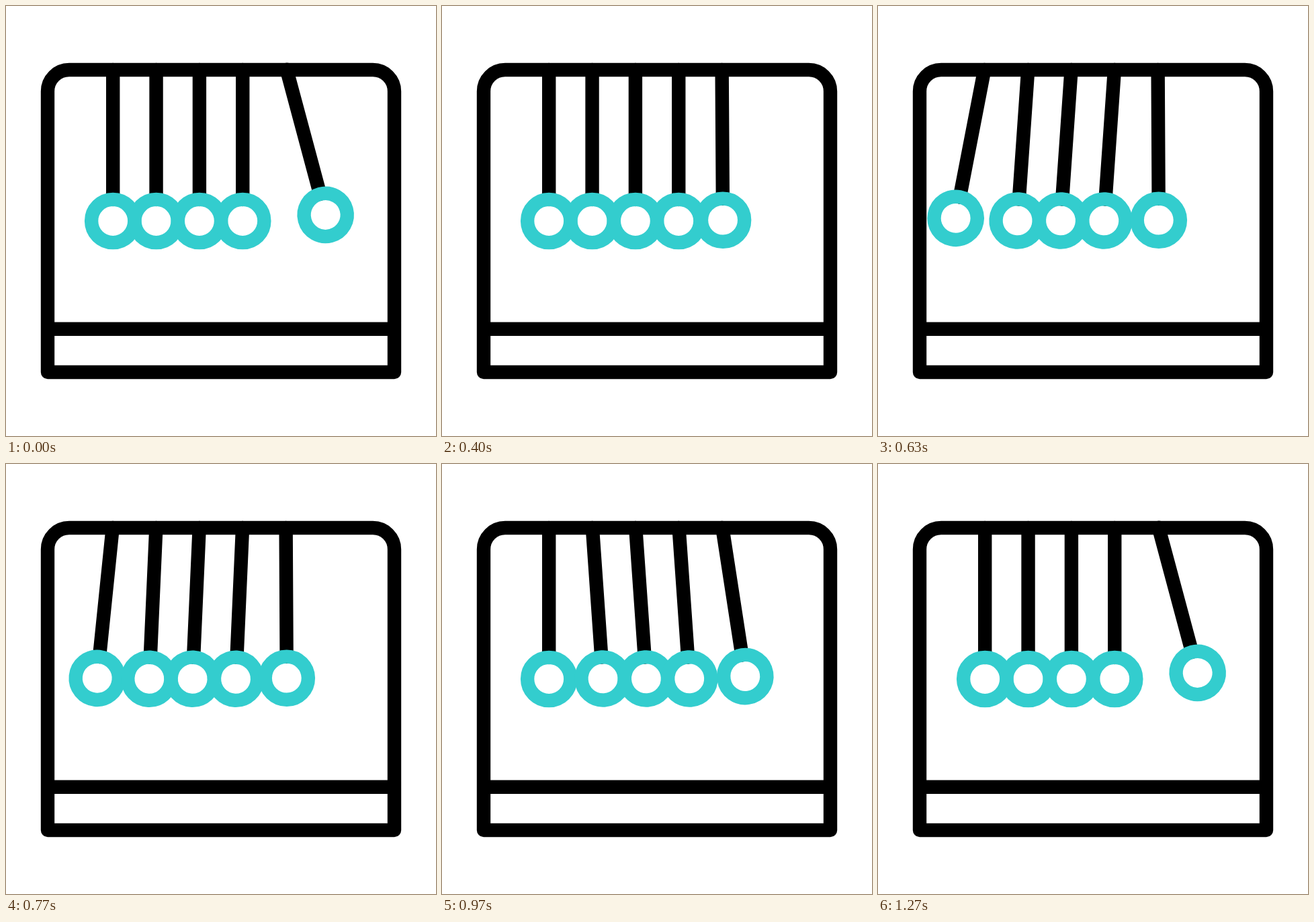
An HTML page with a canvas that plays this animation: 640 px wide and 640 px high, repeating every 1.67 s.

```html
<!DOCTYPE html>
<html lang="en">
<head>
<meta charset="utf-8">
<title>Pendulum cradle</title>
<style>
  html, body { margin: 0; width: 100%; height: 100%; overflow: hidden; background: #fff; }
  canvas { display: block; width: 100vw; height: 100vh; }
</style>
</head>
<body>
<canvas id="stage" width="640" height="640"></canvas>
<script>
const ctx = document.getElementById('stage').getContext('2d');
const LOOP = 1670;
const STEP = 100 / 3; // the motion runs at 30 steps per second
const STROKE = 20.4;
const PIVOT_Y = 90.5;

// Eased progress from 0 to 1 between two steps
function ease(step, from, to) {
  const x = Math.min(1, Math.max(0, (step - from) / (to - from)));
  return x * x * (3 - 2 * x);
}

// Swing angles in degrees, positive to the right
function leftAngle(step) {
  return 11 * (ease(step, 19.8, 26.5) - ease(step, 12.3, 19.3));
}

function middleAngle(step) {
  return -4 * ease(step, 12.3, 19.3) + 8 * ease(step, 21.1, 28.1)
    - 4 * ease(step, 30.9, 37.9);
}

function rightAngle(step) {
  return 15 + 14.7 * (ease(step, 25.15, 32.15) - ease(step, 3.45, 12.35));
}

function drawFrame() {
  ctx.strokeStyle = '#000';
  ctx.lineWidth = STROKE;
  ctx.lineJoin = ctx.lineCap = 'round';
  ctx.beginPath();
  ctx.roundRect(62, 95, 516, 450, [32, 32, 0, 0]);
  ctx.moveTo(62, 480.8);
  ctx.lineTo(578, 480.8);
  ctx.stroke();
}

function drawPendulum(x, length, degrees) {
  ctx.save();
  ctx.translate(x, PIVOT_Y);
  ctx.rotate(-degrees * Math.PI / 180);
  ctx.strokeStyle = '#000';
  ctx.beginPath();
  ctx.moveTo(0, 4.5);
  ctx.lineTo(0, length - 32);
  ctx.stroke();
  ctx.strokeStyle = '#33cdce';
  ctx.beginPath();
  ctx.arc(0, length, 32.1, 0, 2 * Math.PI);
  ctx.stroke();
  ctx.restore();
}

function draw(now) {
  const step = Math.floor((now % LOOP + 3.4) / STEP);
  const middle = middleAngle(step);
  const angles = [leftAngle(step), middle, middle, middle, rightAngle(step)];
  ctx.fillStyle = '#fff';
  ctx.fillRect(0, 0, 640, 640);
  drawFrame();
  angles.forEach((angle, i) => {
    drawPendulum(159.2 + 64.35 * i, i < 4 ? 229.5 : 228.2, angle);
  });
}

const start = performance.now();
function tick() {
  draw(performance.now() - start);
  requestAnimationFrame(tick);
}
tick();
</script>
</body>
</html>
```
